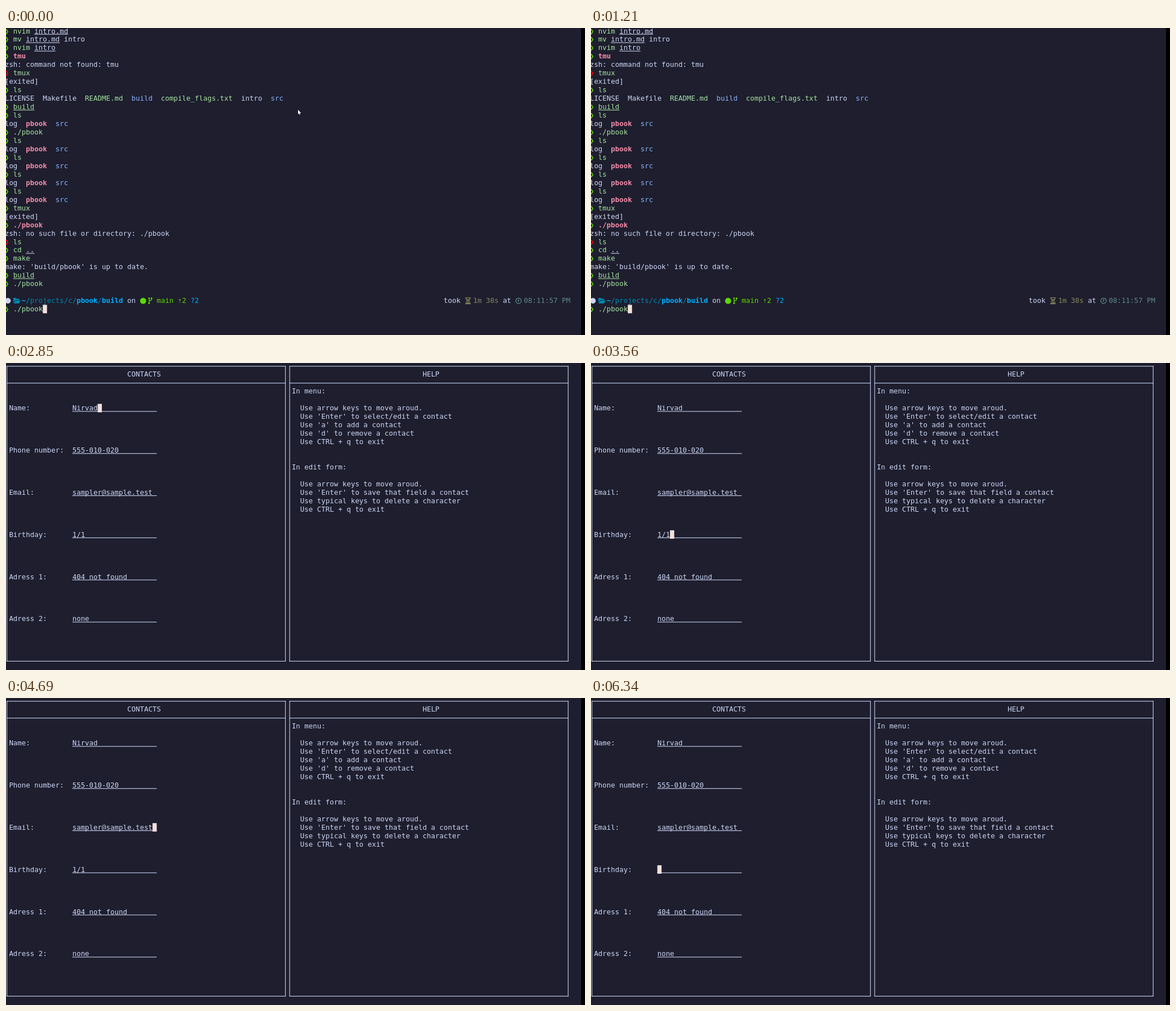
Animation of 1027x545 px, one loop 8 s. Source, as an HTML page with a canvas:

```html
<!DOCTYPE html>
<html lang="en">
<head>
<meta charset="utf-8">
<style>
  html, body { margin: 0; width: 100%; height: 100%; overflow: hidden; background: #1e1e2e; }
  canvas { display: block; }
</style>
</head>
<body>
<canvas id="stage" width="1027" height="545"></canvas>
<script>
const ctx = document.getElementById('stage').getContext('2d');
const LOOP = 8000, CELL_W = 14, CELL_H = 28;

// One-letter styles used in the markup; "b" is bold, "u" is underlined.
const COLORS = {
  t: '#cdd6f4', g: '#a6e3a1', p: '#f38ba8', l: '#89b4fa', k: '#1e1e2e',
  G: '#5fd700', R: '#ff0000', d: '#0087af', D: '#00afff', y: '#87875f', c: '#5f8787'
};
const CURSOR = '#f5e0dc';

const ls = 'G:❯ |g:ls', listing = 't:log  |pb:pbook|l:  src';
const history = [
  'G:❯ |g:nvim |tu:intro.md',
  'G:❯ |g:mv |tu:intro.md|t: intro',
  'G:❯ |g:nvim |tu:intro',
  'G:❯ |pb:tmu',
  't:zsh: command not found: tmu',
  'R:❯ |g:tmux',
  't:[exited]',
  ls,
  't:LICENSE  Makefile  |g:README.md  |l:build  |g:compile_flags.txt  |t:intro  |l:src',
  'G:❯ |gu:build',
  ls, listing,
  'G:❯ |g:./pbook',
  ls, listing, ls, listing, ls, listing, ls, listing,
  'G:❯ |g:tmux',
  't:[exited]',
  'G:❯ |pb:./pbook',
  't:zsh: no such file or directory: ./pbook',
  'R:❯ |g:ls',
  'G:❯ |g:cd |tu:..',
  'G:❯ |g:make',
  "t:make: 'build/pbook' is up to date.",
  'G:❯ |gu:build',
  'G:❯ |g:./pbook'
];

const help = [
  'In menu:', '',
  '  Use arrow keys to move aroud.',
  "  Use 'Enter' to select/edit a contact",
  "  Use 'a' to add a contact",
  "  Use 'd' to remove a contact",
  '  Use CTRL + q to exit', '', '',
  'In edit form:', '',
  '  Use arrow keys to move aroud.',
  "  Use 'Enter' to save that field a contact",
  '  Use typical keys to delete a character',
  '  Use CTRL + q to exit'
];

const contact = [
  ['Name:', 'Nirvad'],
  ['Phone number:', '555-010-020'],
  ['Email:', 'sampler@sample.test'],
  ['Birthday:', '1/1'],
  ['Adress 1:', '404 not found'],
  ['Adress 2:', 'none']
];
const BIRTHDAY = 3;
const focusTimes = [2850, 3230, 3360, 3560, 3690, 3850, 4010, 4530, 4690, 5440];
const deleteTimes = [6020, 6180, 6340];

const passed = (times, t) => times.filter(time => t >= time).length;

function fill(col, row, cols, color, top = 0, height = CELL_H) {
  ctx.fillStyle = color;
  ctx.fillRect(col * CELL_W, row * CELL_H + top, cols * CELL_W, height);
}

function put(col, row, text, style = 't') {
  const color = COLORS[style[0]];
  ctx.font = (style.includes('b') ? 'bold ' : '') + '23.25px "DejaVu Sans Mono", monospace';
  ctx.fillStyle = color;
  ctx.fillText(text, col * CELL_W, row * CELL_H + 22);
  if (style.includes('u')) fill(col, row, text.length, color, 24, 2);
}

function putMarkup(col, row, markup) {
  for (const part of markup.split('|')) {
    const colon = part.indexOf(':'), text = part.slice(colon + 1);
    put(col, row, text, part.slice(0, colon));
    col += text.length;
  }
}

const useCells = () => ctx.setTransform(7.485 / CELL_W, 0, 0, 14.96 / CELL_H, -2.1, -2.25);
const usePixels = () => ctx.setTransform(1, 0, 0, 1, 0, 0);

function shape(path, color, lineWidth) {
  const p = new Path2D(path);
  ctx.lineWidth = lineWidth;
  ctx.strokeStyle = ctx.fillStyle = color;
  if (lineWidth) ctx.stroke(p); else ctx.fill(p);
}

function disc(x, y, r, color) {
  ctx.fillStyle = color;
  ctx.beginPath();
  ctx.arc(x, y, r, 0, 7);
  ctx.fill();
}

function drawPromptIcons() {
  usePixels();
  disc(3.4, 484.2, 5, COLORS.t);
  disc(243.2, 484.4, 5.4, COLORS.G);
  // folder
  shape('M13 487.5V480q0-1 1-1h3l1.3 1.5h4.2q1 0 1 1V483H17q-1 0-1.5 1zM13.5 489l2.5-4.5q.4-.7 1.2-.7H26l-2.6 4.5q-.4.7-1.2.7z', COLORS.d);
  // branch
  shape('M253.8 480.5v7.5M258.2 480.5v1q0 2-2.2 2.4t-2.2 2.4', COLORS.G, 1.3);
  for (const [x, y] of [[253.8, 479.8], [258.2, 479.8], [253.8, 488.6]]) disc(x, y, 1.5, COLORS.G);
  // hourglass
  shape('M814.5 478.8h10M814.5 489.6h10M816 479v1.5q0 2 2.6 3.7q-2.6 1.7-2.6 3.7v1.5M823 479v1.5q0 2-2.6 3.7q2.6 1.7 2.6 3.7v1.5', COLORS.y, 1.2);
  shape('M817 481.5h5l-2.5 2.5zM816.5 489l3-3 3 3z', COLORS.y);
  // clock
  shape('M904.3 484.2a4.8 4.8 0 1 0 9.6 0a4.8 4.8 0 1 0-9.6 0M909.4 481v3.7h-2.4', COLORS.c, 1.3);
  useCells();
}

function drawPointer() {
  usePixels();
  const arrow = 'M518 145V153.2L519.8 151.6L521 154L522.2 153.4L521.1 151.1H523.4Z';
  shape(arrow, '#11111b', 1.2);
  shape(arrow, '#ffffff');
  useCells();
}

function drawShell(t) {
  history.forEach((line, row) => putMarkup(0, row, line));
  putMarkup(4, 32, 'Db:~|d:/projects/c/|Db:pbook|d:/|Db:build|t: on');
  putMarkup(36, 32, 'G:main ⇡2 |D:?2');
  put(104, 32, 'took');
  putMarkup(111, 32, 'y:1m 38s|t: at');
  put(123, 32, '08:11:57 PM', 'c');
  drawPromptIcons();

  const mistyped = t >= 30 && t < 1210;
  const command = mistyped ? './pbook\\' : './pbook';
  put(0, 33, '❯', 'G');
  put(2, 33, command, mistyped ? 'pb' : 'g');
  fill(2 + command.length, 33, 1, CURSOR);
  if (t < 1180) drawPointer();
}

function drawPanel(left, right, titleCol, title) {
  const x = left * CELL_W + 6, width = (right - left) * CELL_W + 2;
  ctx.fillStyle = COLORS.t;
  for (const row of [0, 2, 35]) ctx.fillRect(x, row * CELL_H + 14, width, 2);
  for (const col of [left, right]) ctx.fillRect(col * CELL_W + 6, 14, 2, 35 * CELL_H + 2);
  put(titleCol, 1, title);
}

function drawMenu() {
  const entry = contact[0][1] + ' ' + contact[1][1];
  put(1, 3, '*');
  fill(3, 3, entry.length, COLORS.t);
  put(3, 3, entry, 'k');
}

function drawForm(t) {
  const focus = (passed(focusTimes, t) - 1) % contact.length;
  contact.forEach(([label, full], i) => {
    const row = 5 + 5 * i;
    const value = i === BIRTHDAY ? full.slice(0, full.length - passed(deleteTimes, t)) : full;
    put(1, row, label);
    put(16, row, value.padEnd(20), 'tu');
    if (i === focus) fill(16 + value.length, row, 1, CURSOR);
  });
}

function drawBook(t) {
  drawPanel(0, 66, 29, 'CONTACTS');
  drawPanel(67, 133, 99, 'HELP');
  help.forEach((line, i) => put(68, 3 + i, line));
  if (t < focusTimes[0]) drawMenu(); else drawForm(t);
}

function frame(now) {
  const t = now % LOOP;
  usePixels();
  ctx.fillStyle = COLORS.k;
  ctx.fillRect(0, 0, 1027, 545);
  ctx.fillStyle = '#000';
  ctx.fillRect(1020, 0, 7, 545);
  useCells();
  if (t < 1730) drawShell(t); else drawBook(t);
  requestAnimationFrame(frame);
}
requestAnimationFrame(frame);
</script>
</body>
</html>
```
